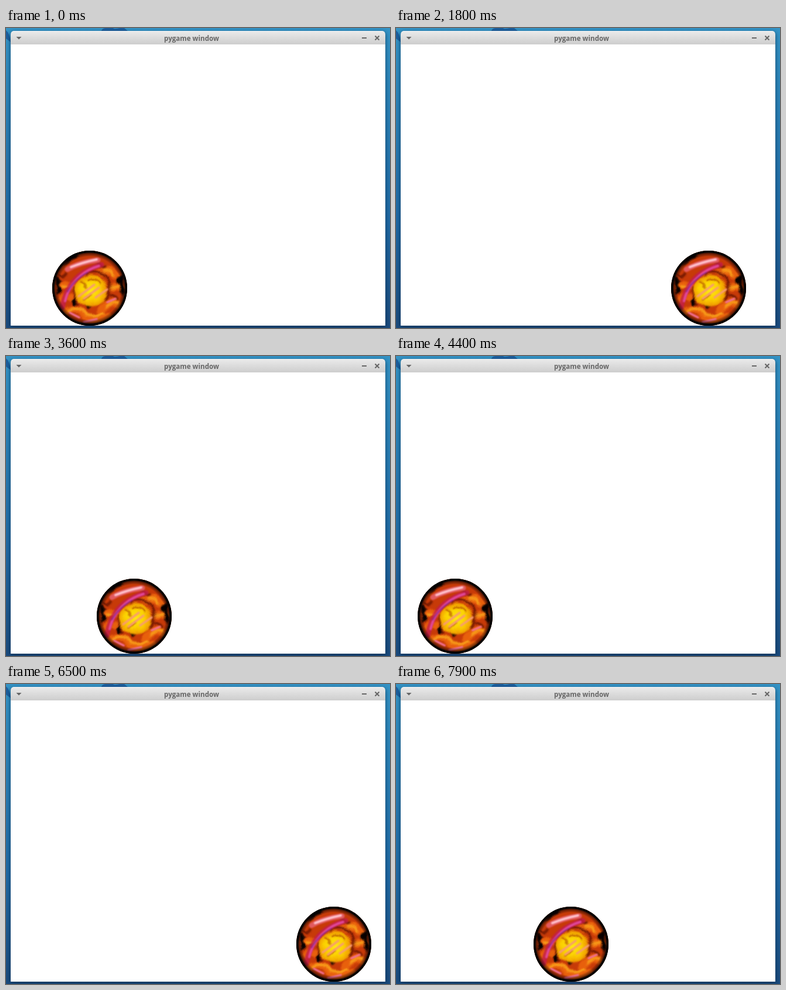
An HTML page for the animation above (8000 ms loop, 656x512 px).

```html
<!DOCTYPE html>
<html lang="en">
<head>
<meta charset="utf-8">
<title>Rolling ball</title>
<style>
  html, body { margin: 0; width: 100%; height: 100%; overflow: hidden; background: #1c6299; }
  svg { display: block; width: 656px; height: 512px; }
  .title { font: bold 11.6px "Open Sans", "Noto Sans", sans-serif; fill: #666; text-anchor: middle; }
  .soft { fill: none; stroke-linecap: round; stroke-linejoin: round; }
</style>
</head>
<body>
<svg viewBox="0 0 656 512">
  <defs>
    <linearGradient id="desk" x2="0" y2="1">
      <stop offset="0" stop-color="#3494c6"/>
      <stop offset=".3" stop-color="#2a80b6"/>
      <stop offset=".65" stop-color="#2069a4"/>
      <stop offset="1" stop-color="#1b4a7c"/>
    </linearGradient>
    <linearGradient id="bar" x2="0" y2="1">
      <stop offset="0" stop-color="#ebebeb"/>
      <stop offset="1" stop-color="#cdcdcd"/>
    </linearGradient>
    <radialGradient id="core">
      <stop offset="0" stop-color="#ffee10"/>
      <stop offset=".6" stop-color="#fbd000"/>
      <stop offset="1" stop-color="#f09a00"/>
    </radialGradient>
    <radialGradient id="rim" gradientUnits="userSpaceOnUse" cx="64" cy="64" r="64">
      <stop offset=".84" stop-color="#000" stop-opacity="0"/>
      <stop offset=".92" stop-color="#0a0000" stop-opacity=".5"/>
      <stop offset=".965" stop-color="#000"/>
    </radialGradient>
    <clipPath id="disc"><circle cx="64" cy="64" r="64"/></clipPath>
    <filter id="shade" filterUnits="userSpaceOnUse" x="0" y="0" width="656" height="512">
      <feGaussianBlur stdDeviation="3.5"/>
    </filter>
    <filter id="marble" filterUnits="userSpaceOnUse" x="-10" y="-10" width="148" height="148" color-interpolation-filters="sRGB">
      <feTurbulence type="fractalNoise" baseFrequency=".05" numOctaves="2" seed="4" result="n"/>
      <feGaussianBlur in="SourceGraphic" stdDeviation="1.8" result="b"/>
      <feDisplacementMap in="b" in2="n" scale="9" xChannelSelector="R" yChannelSelector="G"/>
    </filter>
    <filter id="streak" filterUnits="userSpaceOnUse" x="0" y="0" width="128" height="128" color-interpolation-filters="sRGB">
      <feGaussianBlur stdDeviation="1.1"/>
    </filter>
  </defs>

  <!-- desktop -->
  <rect width="656" height="512" fill="url(#desk)"/>
  <path d="M163 5C164 1 168 0 171 0H183C186 3 191 0 195 0H202L208 5Z M0 4Q6 8 8 24L0 18Z" fill="#1d5f9e"/>
  <rect x="7" y="7" width="642" height="504" rx="5" fill="#0a2c48" opacity=".6" filter="url(#shade)"/>

  <!-- window -->
  <path d="M8 28V11Q8 5 14 5H642Q648 5 648 11V28Z" fill="url(#bar)"/>
  <path d="M11 6.5Q12 5.5 14 5.5H642Q644 5.5 645 6.5" fill="none" stroke="#f4f4f4"/>
  <rect x="8" y="28" width="640" height="480" fill="#fff"/>
  <path d="M17.5 15H26.5L22 19.5Z" fill="#666"/>
  <text class="title" x="317" y="21.5">pygame window</text>
  <path d="M608 17H616M630.5 13.5L637.5 20.5M637.5 13.5L630.5 20.5" fill="none" stroke="#666" stroke-width="2"/>

  <!-- ball -->
  <g id="ball" transform="translate(79 380)">
    <g clip-path="url(#disc)">
      <g filter="url(#marble)">
        <rect x="-10" y="-10" width="148" height="148" fill="#c73a08"/>
        <g class="soft" stroke="#e8600c">
          <path d="M14 62Q24 54 34 60M14 86Q24 72 32 80M22 104Q42 94 56 110T96 110" stroke-width="12"/>
          <path d="M84 36Q98 30 108 42M102 62Q112 56 118 64M84 100Q104 82 114 92" stroke-width="14"/>
        </g>
        <g class="soft" stroke="#f79a18" stroke-width="5">
          <path d="M28 102Q46 94 58 108Q74 114 88 106M88 34Q102 32 104 42M92 96Q104 86 112 88M18 62L28 60M102 62L112 60"/>
        </g>
        <g class="soft" stroke="#6a1400" stroke-width="3.5">
          <path d="M58 39Q80 30 93 46Q104 64 92 84M37 62Q34 80 46 92M78 20Q82 32 90 28M24 38Q20 46 12 44M100 76L112 82"/>
        </g>
        <g fill="#080000">
          <path d="M4 46L14 52L10 60L18 70L8 76Z"/>
          <path d="M122 40L110 46L108 52L116 58L114 70L122 78Z"/>
          <path d="M33 84L39 80L43 92L37 95ZM57 93L67 95L61 100ZM32 5L44 10L18 26Z"/>
        </g>
        <ellipse cx="66" cy="68" rx="29" ry="27" fill="url(#core)"/>
        <path class="soft" d="M50 52Q60 58 56 64M62 50Q72 46 82 56M56 84Q60 78 66 76" stroke="#b04c00" stroke-width="2.5"/>
      </g>
      <g class="soft" filter="url(#streak)">
        <path d="M17 97Q24 62 46 43Q60 31 84 24" stroke="#c21c4c" stroke-width="9" opacity=".8"/>
        <path d="M22 86Q28 60 48 43Q62 31 80 26" stroke="#e0489c" stroke-width="4"/>
        <path d="M26 70Q36 51 60 37" stroke="#8c2a90" stroke-width="2"/>
        <path d="M26 32Q46 20 78 16" stroke="#e25a60" stroke-width="9"/>
        <path d="M32 28Q52 20 76 15" stroke="#ffc4d0" stroke-width="4"/>
        <path d="M45 78L72 58M54 82L80 63M74 80L94 66" stroke="#f79a70" stroke-width="3.5"/>
        <path d="M54 122L76 117M30 106L46 114M94 88L108 82" stroke="#f0709a" stroke-width="3.5"/>
      </g>
      <circle cx="64" cy="64" r="64" fill="url(#rim)"/>
    </g>
    <circle cx="64" cy="64" r="62.5" fill="none" stroke="#000" stroke-width="3"/>
  </g>
</svg>
<script>
  const LOOP = 8000, STEP = 100, SPAN = 512, LEFT = 8, TOP = 380;
  // [time, distance travelled]; the path folds back at each wall
  const path = [[0, 71], [1800, 462], [2800, 708], [3600, 877], [5200, 1228], [6500, 1512], [7900, 1821]];
  const ball = document.getElementById('ball');

  function distance(t) {
    const i = path.findIndex(([time], k) => k > 0 && t <= time);
    const [t0, d0] = path[i - 1], [t1, d1] = path[i];
    return d0 + (d1 - d0) * (t - t0) / (t1 - t0);
  }

  function fold(d) {
    const m = d % (2 * SPAN);
    return m > SPAN ? 2 * SPAN - m : m;
  }

  function draw() {
    const t = Math.floor(performance.now() % LOOP / STEP) * STEP;
    const x = Math.round(LEFT + fold(distance(t)));
    ball.setAttribute('transform', `translate(${x} ${TOP})`);
    requestAnimationFrame(draw);
  }
  draw();
</script>
</body>
</html>
```
